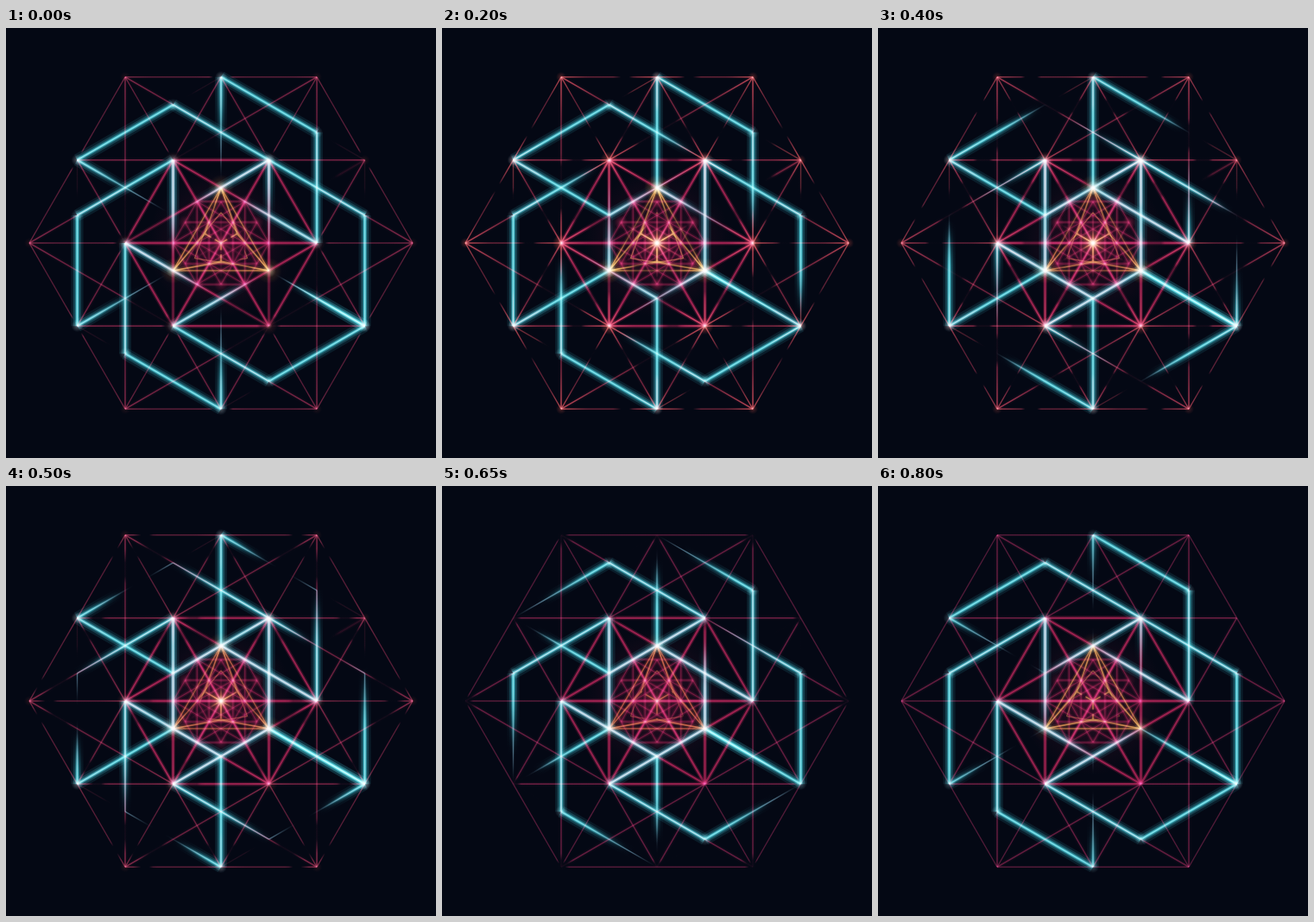
An HTML page with a canvas that plays this animation: 498 px wide and 498 px high, repeating every 0.85 s.

```html
<!DOCTYPE html>
<html lang="en">
<head>
<meta charset="utf-8">
<title>Neon lattice</title>
<style>
html, body { margin: 0; width: 100%; height: 100%; overflow: hidden; background: #040814; }
canvas { display: block; width: 498px; height: 498px; }
</style>
</head>
<body>
<canvas id="stage" width="498" height="498"></canvas>
<script>
const ctx = document.getElementById('stage').getContext('2d');
const LOOP = 850, STEP = 50;
const C = 249, A = 111, H = A * Math.sqrt(3) / 2, R = A / Math.sqrt(3);
const CYAN = [60, 215, 235], PALE = [125, 175, 200];
const DIM = [150, 36, 74], HOT = [240, 82, 62], CRIMSON = [190, 28, 72];
const GOLD = [255, 160, 60], CREAM = [255, 242, 200];

const clamp = (v, a = 0, b = 1) => Math.min(b, Math.max(a, v));
const smooth = (a, b, v) => { v = clamp((v - a) / (b - a)); return v * v * (3 - 2 * v); };
const mix = (a, b, k) => a + (b - a) * k;
const blend = (c, d, k) => c.map((v, i) => mix(v, d[i], k));
const bump = (k, mid, half) => Math.cos(clamp((k - mid) / half, -1, 1) * Math.PI / 2) ** 2;
const len = p => Math.hypot(p[0], p[1]);
const dist = (p, q) => Math.hypot(p[0] - q[0], p[1] - q[1]);
const scaled = (p, s) => [p[0] * s, p[1] * s];
const turn = (p, deg) => {
  const a = deg * Math.PI / 180, c = Math.cos(a), s = Math.sin(a);
  return [p[0] * c - p[1] * s, p[0] * s + p[1] * c];
};
const thirds = p => [0, 120, 240].map(a => turn(p, a));

// Triangular lattice of 19 nodes
const nodes = [];
for (let row = -2; row <= 2; row++) {
  const n = 5 - Math.abs(row);
  for (let i = 0; i < n; i++) nodes.push([(i - (n - 1) / 2) * A, row * H]);
}
const isMid = p => len(p) > 1.5 * A && len(p) < 1.9 * A;

// Near links are triangle sides; far links join second neighbours
const links = [];
nodes.forEach((p, i) => nodes.slice(i + 1).forEach(q => {
  const d = dist(p, q);
  if (d > 1.8 * A) return;
  const [a, b] = len(p) >= len(q) ? [p, q] : [q, p];
  const far = d > 1.5 * A;
  const inner = smooth(1.6, .7, dist(a, scaled(b, -1)) / 2 / A);
  links.push({ a, b, far, inner, rays: far && (isMid(a) || isMid(b)) });
}));

// Six rhombi, each starting at its corner nearest the centre
const face = [[0, -R], [A, 0], [A, -2 * R], [0, -3 * R]];
const faces = [0, 1, 2, 3, 4].map(k => face.map(p => turn(p, -60 * k)));
faces.push([[A / 2, R / 2], [1.5 * A, H], [1.5 * A, -R / 2], [A / 2, -H]]);

const tips = thirds([0, -R]), hubs = thirds([0, R / 3]);

const rgba = (c, a) => `rgba(${c.map(Math.round)},${clamp(a).toFixed(3)})`;

// Line whose opacity follows fade(u); layers are [width, alpha] pairs
function neon(p, q, color, layers, fade, n = 24) {
  const ends = [C + p[0], C + p[1], C + q[0], C + q[1]];
  const g = ctx.createLinearGradient(...ends);
  for (const [width, alpha] of layers) {
    const g = ctx.createLinearGradient(...ends);
    for (let i = 0; i <= n; i++) g.addColorStop(i / n, rgba(color, alpha * fade(i / n)));
    ctx.strokeStyle = g;
    ctx.lineWidth = width;
    ctx.beginPath();
    ctx.moveTo(ends[0], ends[1]);
    ctx.lineTo(ends[2], ends[3]);
    ctx.stroke();
  }
}

function glow(p, radius, color, alpha) {
  const x = C + p[0], y = C + p[1];
  const g = ctx.createRadialGradient(x, y, 0, x, y, radius);
  g.addColorStop(0, rgba(color, alpha));
  g.addColorStop(.35, rgba(color, alpha * .45));
  g.addColorStop(1, rgba(color, 0));
  ctx.fillStyle = g;
  ctx.fillRect(x - radius, y - radius, radius * 2, radius * 2);
}

function drawLattice(k, flash) {
  const gap = .97 - 1.3 * k;
  const hot = blend(DIM, HOT, flash);
  for (const { a, b, far, inner, rays } of links) {
    const half = far ? .08 + .2 * smooth(.4, 0, k) : .08;
    const near = u => smooth(.3, .02, Math.min(u, 1 - u));
    const line = u => {
      if (rays) return .4 * flash * smooth(.22, .17, Math.min(u, 1 - u));
      const cut = smooth(half * .8, half * 1.2, Math.abs(u - gap));
      return mix(.62, .8, inner) * mix(1, cut, 1 - .6 * inner);
    };
    const tone = blend(blend(DIM, hot, .35), CRIMSON, inner);
    neon(a, b, tone, [[5, .28 * inner], [1.3 + inner, .85]], line);
    neon(a, b, hot, [[1.4, .75]], u => near(u) * line(u) * flash);
  }
}

function drawSmallLattice(flash) {
  for (const { a, b, rays } of links) {
    if (rays) continue;
    neon(scaled(a, .25), scaled(b, .25), CRIMSON, [[4, .16], [1.2, .42]], () => 1, 1);
  }
  for (const p of nodes) {
    if (len(p) > 1.5 * A) glow(scaled(p, .25), 8, [240, 45, 95], .2 + .35 * flash);
  }
}

function drawFaces(k) {
  const gap = 4 * k;
  for (const f of faces) {
    f.forEach((p, i) => {
      // Signed distance round the outline, from -2 to 2
      const ahead = u => (i + u - gap + 10) % 4 - 2;
      const bright = u => {
        const d = ahead(u);
        return d > 0 ? smooth(.15, .65, d) : smooth(.3, .95, -d);
      };
      const q = f[(i + 1) % 4];
      neon(p, q, CYAN, [[14, .1], [9, .2], [5, .34], [2.6, .66]], bright);
      neon(p, q, PALE, [[1.4, .6]], u => smooth(.06, .4, Math.abs(ahead(u))));
      if (i) glow(p, 7, [170, 235, 250], .45 * bright(0));
    });
  }
}

function drawGold(k, flash) {
  const heat = .74 + .24 * bump(k, .25, .5);
  const color = blend([255, 105, 55], GOLD, bump(k, .2, .55) + smooth(.8, 1, k));
  const thin = [[5, .16], [1.6, .8]];
  // Strokes stay bright at the tips and part in the middle during the flash
  const part = u => heat * mix(1, mix(.35, 1, smooth(.12, .45, Math.abs(u - .55))), flash);
  const dash = lag => u => heat * smooth(.08, .16, Math.abs(u - 1.2 + 1.4 * ((k + lag) % 1)));
  tips.forEach((tip, i) => {
    const next = tips[(i + 1) % 3];
    neon(tip, next, color, thin, part);
    tips.forEach((v, j) => {
      if (j === i) return;
      neon(tip, hubs[j], color, thin, part);
      neon(tip, scaled(v, .55), color, [[1.4, .5]], dash(.3 * j));
    });
    neon([0, 0], hubs[i], color, thin, dash(.5));
  });
  const shine = .4 + .6 * flash;
  for (const tip of tips) {
    glow(tip, 15, GOLD, shine * .55);
    glow(tip, 8, CREAM, shine);
  }
}

function drawCore(k) {
  const on = smooth(0, .1, k) * smooth(.85, .5, k);
  glow([0, 0], 17, GOLD, on * .55);
  glow([0, 0], 7, CREAM, on);
  for (let i = 0; i < 12; i++) {
    neon([0, 0], turn([0, i % 2 ? -10 : -16], i * 30), GOLD, [[1.5, .8]], u => on * (1 - u), 2);
  }
}

function draw(t) {
  const k = t / LOOP, flash = bump(k, .3, .5);
  ctx.globalCompositeOperation = 'source-over';
  ctx.fillStyle = '#040814';
  ctx.fillRect(0, 0, 498, 498);
  ctx.globalCompositeOperation = 'screen';
  glow([0, 0], 85, CRIMSON, .3);
  drawLattice(k, flash);
  drawSmallLattice(flash);
  drawFaces(k);
  drawGold(k, flash);
  for (const p of nodes) {
    const inner = len(p) < 1.2 * A;
    glow(p, inner ? 10 : 6, HOT, flash * (inner ? .75 : .45));
    if (inner) glow(p, 4, CREAM, flash * .6);
  }
  drawCore(k);
}

let start = null, shown = -1;
function tick(now) {
  start ??= now;
  const t = Math.floor(((now - start) % LOOP) / STEP) * STEP;
  if (t !== shown) draw(shown = t);
  requestAnimationFrame(tick);
}
draw(0);
requestAnimationFrame(tick);
</script>
</body>
</html>
```
